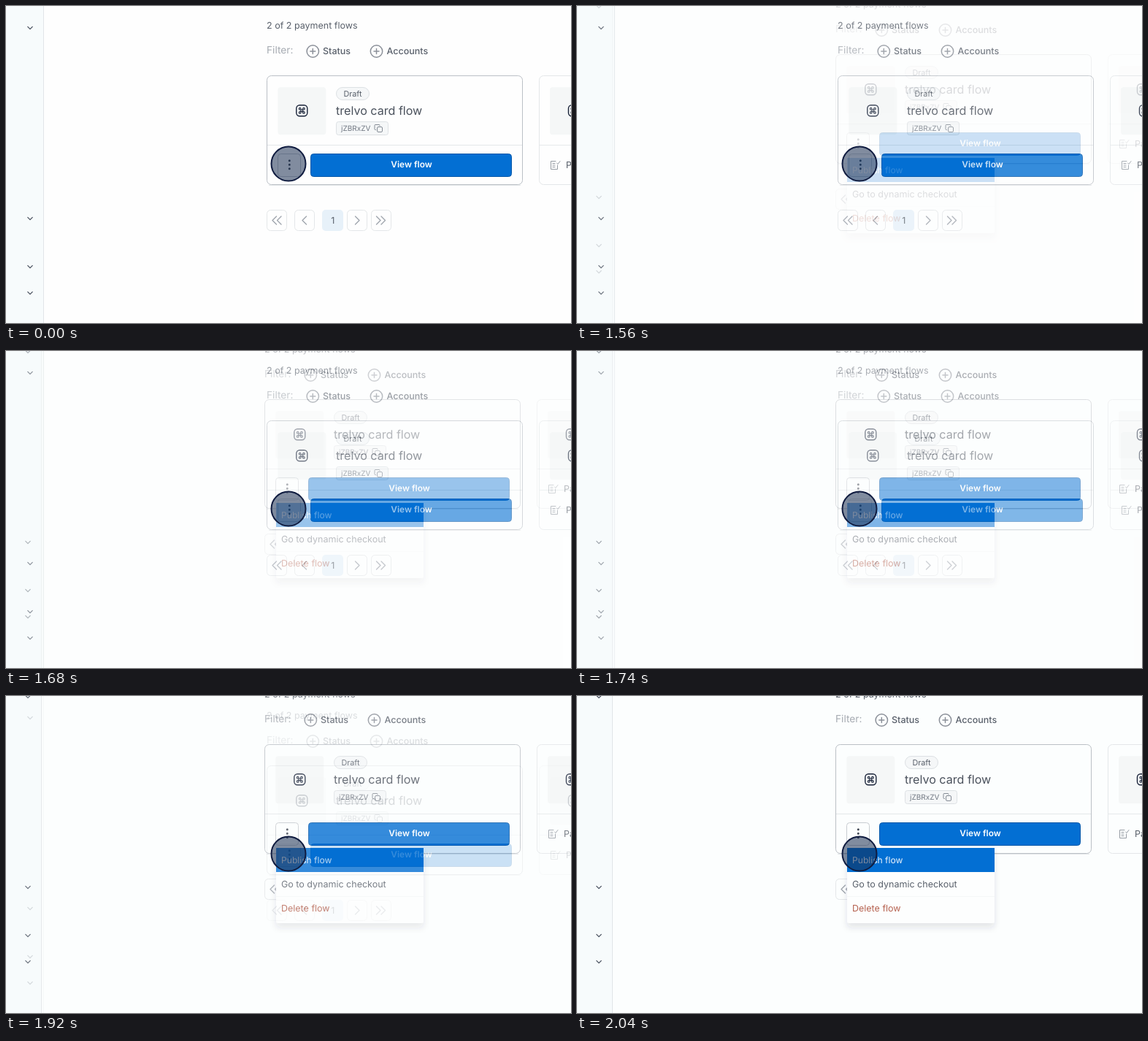
Animation, 774 px wide and 434 px high, one loop 3.54 s. Source, as an HTML page:

```html
<!DOCTYPE html>
<html lang="en">
<head>
<meta charset="utf-8">
<title>Payment flows</title>
<style>
  html, body { margin: 0; width: 100%; height: 100%; overflow: hidden; background: #fff; }
  svg { display: block; width: 774px; height: 434px; }
  text { font: 12.5px Inter, sans-serif; fill: #59606b; text-rendering: geometricPrecision; }
  .line { fill: none; stroke-linecap: round; stroke-linejoin: round; }
  .mid { text-anchor: middle; }
  .navy { stroke: #182238; }
  .gray { stroke: #a0a6ae; stroke-width: 1.4; }
  .box { fill: none; stroke: #e4e7e9; }
  .tag { fill: #f5f7f8; stroke: #dde1e4; }
  .title { font-size: 16.1px; fill: #4a515c; }
  .filter { font-size: 13.7px; fill: #a6abb2; }
  .option { font-weight: 500; }
  .small { font-size: 10.8px; }
  .code { font-size: 10px; fill: #707782; }
  .button { font-size: 11.9px; font-weight: 600; fill: #fff; }
  .active { fill: #eef5fc; font-size: 12.1px; }
  .danger { fill: #b5614f; }
</style>
</head>
<body>
<svg viewBox="0 0 774 434">
  <defs>
    <filter id="soft" x="-10%" y="-20%" width="120%" height="150%">
      <feDropShadow dx="0" dy="6" stdDeviation="4" flood-color="#28344a" flood-opacity=".12"/>
    </filter>
    <path id="down" class="line" d="M-3.2-1.6L0 1.6 3.2-1.6" stroke="#4b5361" stroke-width="1.3"/>
    <path id="prev" class="line gray" d="M3-5.5L-2.5 0 3 5.5"/>
    <g id="double"><use href="#prev" x="-3"/><use href="#prev" x="3.5"/></g>
    <rect id="step" class="box" x="-13.5" y="-14" width="27" height="28" rx="5"/>
    <g id="plus" class="line" stroke="#8b9099" stroke-width="1.5">
      <circle r="8.2"/><path d="M-3.5 0H3.5M0-3.5V3.5"/>
    </g>
    <g id="tile">
      <rect x="-33" y="-32" width="66" height="65" rx="4" fill="#f5f7f7"/>
      <g class="line navy">
        <rect x="-7.5" y="-7.5" width="15" height="15" rx="4.5" stroke-width="1.4"/>
        <path transform="scale(.44) translate(-12 -12)" stroke-width="2.5"
          d="M18 3a3 3 0 0 0-3 3v12a3 3 0 1 0 3-3H6a3 3 0 1 0 3 3V6a3 3 0 1 0-3 3h12a3 3 0 0 0 0-6"/>
      </g>
    </g>

    <g id="page">
      <path d="M0 0H51V470H0z" fill="#f7fbfc"/>
      <path d="M51.5 0V470" stroke="#e1e5e8"/>
      <use href="#down" x="33" y="30"/>
      <use href="#down" x="33" y="291"/>
      <use href="#down" x="33" y="357"/>
      <use href="#down" x="33" y="393"/>

      <text x="357" y="31.3">2 of 2 payment flows</text>
      <text x="357" y="65.3" class="filter">Filter:</text>
      <use href="#plus" x="420.3" y="62"/>
      <text x="434" y="66.3" class="option">Status</text>
      <use href="#plus" x="507.5" y="62"/>
      <text x="521.5" y="66.3" class="option">Accounts</text>

      <path d="M360 245.5H705" stroke="#e3e6e8"/>
      <rect x="357.5" y="95.5" width="350" height="149" rx="6" fill="none" stroke="#bbc0c6"/>
      <path d="M358 190.5H707" stroke="#e4e7e9"/>
      <use href="#tile" x="405.3" y="143.3"/>
      <rect x="452.5" y="111.5" width="45" height="17" rx="8.5" class="tag"/>
      <text x="475" y="124.3" class="small mid">Draft</text>
      <text x="452" y="148.5" class="title">trelvo card flow</text>
      <rect x="452.5" y="158.5" width="71" height="18" rx="3" class="tag"/>
      <text x="459" y="171.4" class="code">jZBRxZV</text>
      <g class="line" stroke="#858c95">
        <rect x="508.5" y="165.5" width="7" height="7" rx="1.5"/>
        <path d="M506.500 169.500H506a1 1 0 0 1-1-1V163.500a1 1 0 0 1 1-1H511a1 1 0 0 1 1 1V164"/>
      </g>
      <rect x="372.5" y="202.5" width="31" height="31" rx="4" fill="none" stroke="#c8ccd1"/>
      <path class="line" d="M388.3 211.8v.01m0 5.5v.01m0 5.5v.01" stroke="#3f4652" stroke-width="3"/>
      <rect x="417.5" y="202.5" width="275" height="31" rx="4" fill="#036fd3" stroke="#0557a8"/>
      <text x="555.5" y="221.4" class="button mid">View flow</text>

      <rect x="730.5" y="95.5" width="350" height="149" rx="6" class="box"/>
      <path d="M731 190.5H1080" stroke="#e6e9eb"/>
      <use href="#tile" x="778" y="143.3"/>
      <path class="line" stroke="#959ba3"
        d="M753 212.5H746.5V223.5H755.5V218M749 215.5H752M749 218H752M749 220.5H752M754.5 215L756 216.500 759 212.500"/>
      <text x="767" y="221.5">Payment methods</text>

      <use href="#step" x="371" y="293.5"/><use href="#double" x="370.5" y="293.5"/>
      <use href="#step" x="409" y="293.5"/><use href="#prev" x="408.5" y="293.5"/>
      <rect x="433" y="279" width="29" height="29" rx="5" fill="#e7f1f9"/>
      <text x="447.8" y="297.7" class="mid">1</text>
      <use href="#step" x="481" y="293.5"/><use href="#prev" transform="translate(481.5 293.5) scale(-1 1)"/>
      <use href="#step" x="514" y="293.5"/><use href="#double" transform="translate(514 293.5) scale(-1 1)"/>
    </g>
  </defs>

  <rect width="774" height="434" fill="#fefefe"/>
  <use href="#page"/>

  <g id="opened">
    <rect width="774" height="434" fill="#fcfefe"/>
    <use href="#page" x="-3" y="-29"/>
    <rect x="370" y="208" width="202" height="103" rx="3" fill="#fdfefe" filter="url(#soft)"/>
    <path d="M370 208H572V241H370z" fill="#036fd3"/>
    <path d="M370 274.5H572" stroke="#f5f7f7"/>
    <text x="377" y="228.6" class="active">Publish flow</text>
    <text x="377" y="261.8">Go to dynamic checkout</text>
    <text x="377" y="294.8" class="danger">Delete flow</text>
  </g>

  <circle cx="387" cy="216" r="23.5" fill="#14284c" fill-opacity=".53" stroke="#101c40" stroke-width="2"/>
</svg>
<script>
  const LOOP = 3540, FADE_START = 1500, STEP = 60, STEPS = 10;
  const opened = document.getElementById('opened');

  // The menu view dissolves in over ten equal steps, then cuts back.
  function draw() {
    const t = performance.now() % LOOP;
    const step = Math.floor((t - FADE_START) / STEP) + 1;
    opened.setAttribute('opacity', Math.max(0, Math.min(STEPS, step)) / STEPS);
    requestAnimationFrame(draw);
  }
  draw();
</script>
</body>
</html>
```
